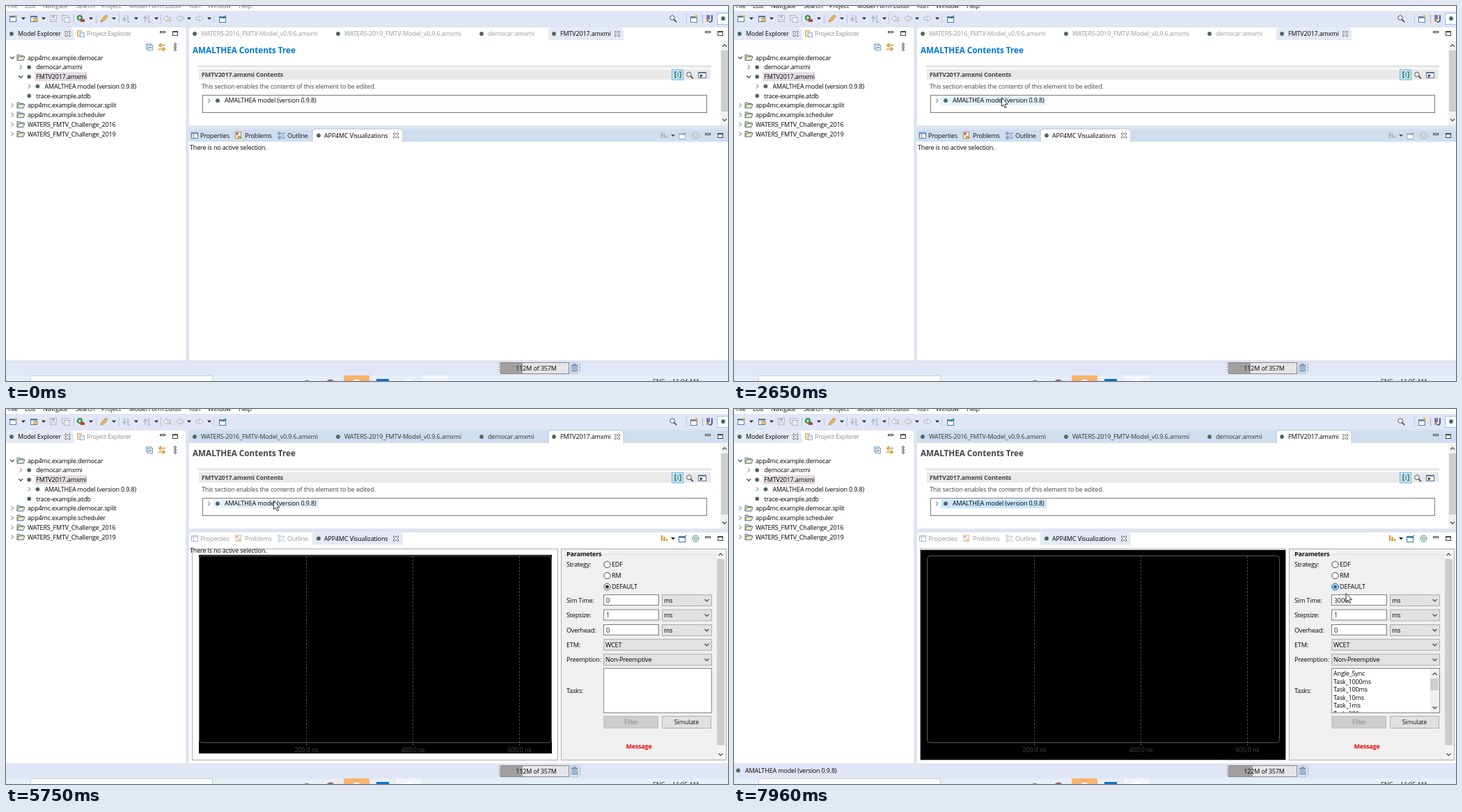
An HTML page that plays this animation: 1037x540 px, repeating every 8 s.

```html
<!DOCTYPE html>
<html lang="en">
<head>
<meta charset="utf-8">
<title>Model workbench</title>
<style>
  html, body { margin: 0; width: 100%; height: 100%; overflow: hidden; background: #e0e6f5; }
  svg { display: block; width: 1037px; height: 540px; }
  text { font: 9px "Open Sans", "Noto Sans", sans-serif; letter-spacing: -.16px; white-space: pre; }
  .b { font-weight: 700; letter-spacing: -.2px; }
  .title { font-size: 11.7px; letter-spacing: 0; }
</style>
</head>
<body>
<svg id="stage" viewBox="0 0 1037 540"></svg>
<script>
const LOOP = 8000;
const stage = document.getElementById('stage');

// Colours of the window and of focused and unfocused tab strips.
const BACK = '#e0e6f5', STRIP = '#cfdeef', IDLE_TAB = '#e4e9f6';

// Drawing helpers; text is placed by its vertical centre.
const text = (x, y, s, fill = '#000', cls = '', anchor = 'start') =>
  `<text x="${x}" y="${y + 3.2}" fill="${fill}" class="${cls}" text-anchor="${anchor}">${s}</text>`;
const rect = (x, y, w, h, fill = 'none', stroke = 'none', r = 0) =>
  `<rect x="${x}" y="${y}" width="${w}" height="${h}" fill="${fill}" stroke="${stroke}" rx="${r}"/>`;
const path = (d, stroke, fill = 'none', w = 1, extra = '') =>
  `<path d="${d}" stroke="${stroke}" fill="${fill}" stroke-width="${w}" ${extra}/>`;
const dot = (x, y, r, fill, stroke = 'none') =>
  `<circle cx="${x}" cy="${y}" r="${r}" fill="${fill}" stroke="${stroke}"/>`;
const during = (from, to, ...parts) => `<g data-on="${from},${to}">${parts.join('')}</g>`;

const mark = (x, y) => dot(x, y, 2.9, '#4c6b58');
const drop = (x, y = 18) => path(`M${x - 3},${y - 1.5}h6l-3,3.2z`, 'none', '#222');
const chevron = (x, y, dir = 'down', color = '#444') => path({
  down: `M${x - 3},${y - 1.5}l3,3l3,-3`,
  up: `M${x - 3},${y + 1.5}l3,-3l3,3`,
  right: `M${x - 1.5},${y - 3}l3,3l-3,3`
}[dir], color, 'none', 1.2);
const grip = (x, y, h, color = '#8c93a5') =>
  path(`M${x},${y}v${h}`, color, 'none', 1, 'stroke-dasharray="1 2"');
const cross = (x, y) => path(
  `M${x - 3.5},${y - 3.5}h2l1.5,2l1.5,-2h2v2l-2,1.5l2,1.5v2h-2l-1.5,-2l-1.5,2h-2v-2l2,-1.5l-2,-1.5z`,
  '#555', '#fff', .8);
const minMax = (x, y) =>
  rect(x - 3.5, y - 3.5, 7, 2, '#fff', '#444') + rect(x + 14.5, y - 3.5, 7, 6, '#fff', '#444') +
  path(`M${x + 14},${y - 2.5}h8`, '#444');
const pane = (x, y, w, h) => path(
  `M${x},${y + h}V${y + 5}q0,-5 5,-5h${w - 10}q5,0 5,5v${h - 5}z`, '#d3d9e8', '#fff');
const sheet = (x, y, c) => rect(x - 4.5, y - 3.5, 9, 8, '#fff', c) + path(`M${x - 5},${y - 2.5}h10`, c, 'none', 2);
const lens = (x, y) =>
  dot(x - 1, y - 1, 3.3, '#eef3fa', '#555') + path(`M${x + 1.5},${y + 1.5}l3.5,3.5`, '#555', 'none', 1.8);
const arrow = (x, dir) => path(
  `M${x - 5 * dir},16.3h${5 * dir}v-2.6l${5 * dir},4.3l${-5 * dir},4.3v-2.6h${-5 * dir}z`, '#a5a9b0', '#eef0f4', .9);

function menuBar() {
  const items = [[3, 'File'], [27, 'Edit'], [53, 'Navigate'], [100, 'Search'], [137, 'Project'],
    [177, 'Model Form Editor'], [263, 'Run'], [290, 'Window'], [334, 'Help']];
  const row = color => items.map(([x, s]) => text(x, -.2, s, color)).join('');
  return rect(0, 0, 1037, 7, '#fff') + during(0, 1920, row('#777')) + during(1920, LOOP, row('#111'));
}

function toolbar() {
  const gray = '#b3b7c0';
  return [
    sheet(10, 18, '#55789e'), dot(14.5, 14.5, 1.8, '#e8b93c'), sheet(40, 18, '#55789e'),
    rect(40, 18, 5, 4, '#f2d37a', '#a98a3c'),
    rect(63.5, 13.5, 9, 9, '#e8ebf1', gray), rect(66, 14, 4, 3, gray), rect(65.5, 19.5, 5, 3, '#fff', gray),
    rect(80.5, 13.5, 8, 7, '#e8ebf1', gray), rect(83.5, 16.5, 8, 7, '#e8ebf1', gray),
    dot(106, 17, 4.3, '#3c9b4e'), path('M104.7,15v4.2l3.5,-2.1z', 'none', '#fff'), rect(107, 19, 6, 4, '#b5493f'),
    path('M136,22l4,-6l4,-3l2,2l-3,4l-5,4z', '#b9803a', '#f1bb62'),
    path('M170,13v8m-2,-3l2,3.5l2,-3.5M175,13v10h3', gray, 'none', 1.6),
    path('M200,23v-8m-2,3l2,-3.5l2,3.5M205,13v10h3', gray, 'none', 1.6),
    arrow(231, -1), arrow(250, -1), arrow(278, 1), dot(235, 21, 1.5, '#d0bd83'),
    sheet(311, 19, '#3f789d'), path('M312,18l4,-4', '#3d9160', 'none', 2),
    [25, 54, 122, 155, 187, 216, 263, 292].map(x => drop(x)).join(''),
    [97.5, 129.5, 162.5, 222.5, 298.5].map(x => path(`M${x},12v13`, '#bcc4d5')).join(''),
    lens(958, 18), grip(977.5, 12, 13), sheet(988, 19, '#55789e'), dot(991.5, 14.5, 1.9, '#e8b93c'),
    path('M1000.5,12v13', '#a9b1c2'),
    rect(1006, 13, 5, 6, '#8b6fae'), path('M1014,13v7q0,3 -4,3', '#3c699c', 'none', 2), dot(1008, 21, 2, '#c88b3e'),
    rect(1021.5, 10.5, 20, 16, '#f7fbff', '#9bc3e6'), mark(1030, 18)
  ].join('');
}

function folder(x, y) {
  return path(`M${x - 5},${y + 4}v-8h4l1,1.5h4v2`, '#4d759b', '#f5dc92') +
    path(`M${x - 5},${y + 4}l2,-5.5h9l-2,5.5z`, '#4d759b', '#f3e6b4');
}

function explorer() {
  const rows = [[0, 'down', 'app4mc.example.democar'], [1, 'right', 'democar.amxmi'], [1, 'down', 'FMTV2017.amxmi'],
    [2, 'right', 'AMALTHEA model (version 0.9.8)'], [1, '', 'trace-example.atdb'],
    [0, 'right', 'app4mc.example.democar.split'], [0, 'right', 'app4mc.example.scheduler'],
    [0, 'right', 'WATERS_FMTV_Challenge_2016'], [0, 'right', 'WATERS_FMTV_Challenge_2019']];
  const tree = rows.map(([level, fold, name], i) => {
    const x = 9 + level * 12.2, y = 74.3 + i * 13.75;
    return (i === 2 ? rect(41, y - 6.5, 75, 13, '#e4dce2') : '') +
      (fold ? chevron(x, y, fold, fold === 'down' ? '#333' : '#999') : '') +
      (level ? mark(x + 12, y) : folder(x + 12, y)) + text(x + 22, y, name);
  }).join('');
  return pane(-6, 30, 265, 481) +
    path('M0,49V30.5h90q6,0 7,6l2,12.5z', 'none', IDLE_TAB) +
    mark(8, 40) + text(17, 39.8, 'Model Explorer') + cross(88.5, 40) +
    rect(102.5, 35.5, 6, 8, '#f3e3b4', '#c0aa72') + rect(106.5, 38.5, 6, 6, '#e5eef8', '#9db3cb') +
    text(116, 39.8, 'Project Explorer', '#8c8c8c') + minMax(225, 40) +
    rect(201.5, 54.5, 7, 7, '#fff', '#6e9cc4') + rect(203.5, 56.5, 7, 7, '#eef5fc', '#6e9cc4') + path('M205,60h4', '#345') +
    path('M229,56.5h-9m3,-3l-3,3l3,3M219,62h9m-3,-3l3,3l-3,3', '#d39a37', 'none', 1.7) +
    [55, 59, 63].map(y => dot(243, y, 1.4, '#fff', '#555')).join('') + tree;
}

function editor() {
  const names = [[280, 'WATERS-2016_FMTV-Model_v0.9.6.amxmi'], [486, 'WATERS-2019_FMTV-Model_v0.9.6.amxmi'], [692, 'democar.amxmi']];
  const tab = 'M779,49V36q0,-5.5 5,-5.5h97q6,0 6,5.5V49';
  const tabs = color => names.map(([x, s]) => text(x, 39.8, s, color)).join('');
  const title = color => text(268, 64.4, 'AMALTHEA Contents Tree', color, 'b title');
  const strip = path('M262.5,49V35q0,-4.5 5,-4.5H1037V49z', 'none', STRIP);
  return pane(262, 30, 785, 143) +
    during(0, 5750, path(tab, 'none', IDLE_TAB), tabs('#999'), title('#0078d7')) +
    during(5750, LOOP, strip, path(tab, '#b5c3d8', '#fff'), tabs('#333'), title('#444')) +
    [271, 477, 683, 787].map(x => mark(x, 40)).join('') +
    text(796, 39.8, 'FMTV2017.amxmi') + cross(878, 40) + minMax(1008, 40) +
    rect(275, 85, 738, 4, '#e9e9e9') + rect(277, 91, 735, 15, '#e9e9e9') +
    text(281, 99.2, 'FMTV2017.amxmi Contents', '#444', 'b') +
    rect(956.5, 91.5, 16, 15, '#bfe0f7', '#82b9e0') +
    path('M963,95h-2v8h2M967,95h2v8h-2', '#3c7a48', 'none', 1.4) + path('M965,96v6', '#3c7a48') + lens(982, 99.5) +
    rect(994.5, 95.5, 11, 8, '#fff', '#55789e') + rect(994, 95, 12, 2, '#55789e') + path('M997,98v5l4,-2.5z', 'none', '#333') +
    text(281, 116, 'This section enables the contents of this element to be edited.', '#444') +
    rect(282.5, 128.5, 724, 25, '#fff', '#777') +
    during(1245, 5800, rect(297, 130, 152, 13, '#e5f3ff')) +
    during(5800, LOOP, rect(297, 130, 152, 13, '#cce8ff')) +
    during(5800, 6160, rect(296.5, 129.5, 153, 13, 'none', '#99d1ff')) +
    chevron(291.5, 136.5, 'right', '#999') + mark(304, 136.2) + text(314, 136, 'AMALTHEA model (version 0.9.8)') +
    rect(1026, 50, 11, 122, '#f0f0f0') + rect(1027, 64, 10, 88, '#cdcdcd') +
    chevron(1032, 57, 'up') + chevron(1032, 164);
}

function viewTabs() {
  const tab = 'M440,195.5V182q0,-5 5,-5h120q5,0 5,5V195.5';
  const labels = c => text(279, 186.5, 'Properties', c) + text(343, 186.5, 'Problems', c) + text(404, 186.5, 'Outline', c);
  const tools = (chart, win, target, arrowTone) =>
    path('M942,182v8M945.5,184v6M949,187v3', chart, 'none', 2.4) +
    path('M955,185h6l-3,3.2z', 'none', arrowTone) + sheet(971, 187, win) + path('M973,186l4,-4', win, 'none', 1.5) +
    dot(990.5, 186.5, 4.5, '#fff', target) + dot(990.5, 186.5, 2, 'none', target);
  const icons =
    rect(266.5, 182.5, 9, 8, '#fff', '#5474a0') + path('M266,184h10M269.5,184v7', '#5474a0') +
    rect(329.5, 181.5, 8, 9, '#f8eedd', '#b48c62') + dot(332, 184, 1.8, '#cb5146') + rect(333, 187, 4, 3, '#d7a53b') +
    path('M391,182h3v3h-3zM391,188h3v3h-3zM396,183.5h5M396,187h3M396,190h5', '#4578b0');
  return pane(262, 177, 785, 334) +
    during(0, 5750, path('M263,195.5V182q0,-4.5 5,-4.5H1037V195.5z', 'none', STRIP),
      path(tab, '#b5c3d8', '#fff'), icons, labels('#111'), tools('#b5b5b5', '#a5a9b0', '#888', '#555')) +
    during(5750, LOOP, path(tab, 'none', IDLE_TAB), `<g opacity=".5">${icons}</g>`, labels('#999'),
      tools('#d99a33', '#3f789d', '#36796f', '#111')) +
    mark(449, 186.5) + text(457, 186.5, 'APP4MC Visualizations') + cross(560, 186.5) + minMax(1008, 187);
}

function plot() {
  const ticks = [[431.5, '200.0 ns'], [584.5, '400.0 ns'], [737.5, '600.0 ns']];
  return during(0, 5800, text(264, 203.5, 'There is no active selection.')) +
    during(5170, LOOP, rect(267.5, 201.5, 525, 304, 'none', '#aaa'), rect(797.5, 201.5, 237, 304, '#fff', '#aaa')) +
    during(5430, 5800, rect(277, 210, 507, 286, '#000')) +
    during(5800, LOOP, rect(268, 203, 524, 302, '#000')) +
    during(5430, LOOP,
      rect(277.5, 211.5, 506, 269, 'none', '#5c5c5c', 4),
      ticks.map(([x, s]) => path(`M${x},212v273`, '#4a4a4a', 'none', 1, 'stroke-dasharray="3 2"') +
        text(x, 491, s, '#484848', '', 'middle')).join(''));
}

function combo(x, y, w, s) {
  return rect(x + .5, y - 7.5, w, 16, '#e2e2e2', '#adadad') + text(x + 3, y + .5, s) + chevron(1006.5, y + .5);
}
const field = (y, s) => rect(858.5, y - 7.5, 79, 15, '#fff', '#7a7a7a') + text(862, y + .5, s);

function parameters() {
  const radio = (y, s) => dot(863.5, y, 4.6, '#fff', '#444') + text(870, y, s);
  const hover = (from, to, y) => during(from, to, dot(863.5, y, 4.6, 'none', '#0078d7'));
  const label = (y, s) => text(805, y, s);
  const tasks = ['Angle_Sync', 'Task_1000ms', 'Task_100ms', 'Task_10ms', 'Task_1ms', 'Task_200ms'];
  return during(5430, LOOP, rect(798, 202, 236, 303, '#f0f0f0'), rect(1021, 203, 12, 301, '#f4f4f4'),
      rect(1021, 216, 11, 268, '#cdcdcd'), chevron(1026.5, 209.5, 'up'), chevron(1026.5, 497.5)) +
    during(5430, 5480, rect(798, 203, 42, 11, '#fff')) +
    during(5480, LOOP,
      path('M800,209.5h4M857,209.5h159', '#dcdcdc'), text(805, 209, 'Parameters', '#111', 'b'),
      label(224, 'Strategy:'), radio(224, 'EDF'), radio(240, 'RM'), radio(256, 'DEFAULT'), dot(863.5, 256, 2.5, '#333')) +
    hover(7630, 7685, 224) + hover(7740, 7850, 240) +
    hover(7850, LOOP, 256) + during(7850, LOOP, dot(863.5, 256, 2.5, '#1268b3')) +
    during(5520, LOOP,
      label(275.5, 'Sim Time:'), label(297, 'Stepsize:'), label(318.5, 'Overhead:'),
      field(275, ''), field(296.5, '1'), field(318, '0'),
      [275, 296.5, 318].map(y => combo(942, y, 71, 'ms')).join('')) +
    during(5520, 6110, text(862, 275.5, '0')) + during(6110, LOOP, text(862, 275.5, '3000')) +
    during(5570, LOOP,
      label(339.5, 'ETM:'), combo(858, 339, 155, 'WCET'),
      label(361, 'Preemption:'), combo(858, 360.5, 155, 'Non-Preemptive'),
      label(405.5, 'Tasks:'), rect(858.5, 373.5, 155, 64, '#fff', '#828790'),
      rect(858.5, 442.5, 78, 17, '#ccc', '#bfbfbf'), text(898, 451, 'Filter', '#888', '', 'middle'),
      rect(942.5, 442.5, 70, 17, '#e1e1e1', '#adadad'), text(977.5, 451, 'Simulate', '#111', '', 'middle'),
      text(909, 486, 'Message', '#f00000', 'b', 'middle')) +
    during(6110, LOOP,
      '<clipPath id="list"><path d="M859,374h154v63h-154z"/></clipPath><g clip-path="url(#list)">',
      tasks.map((s, i) => text(861, 381 + i * 11.5, s)).join(''), '</g>',
      rect(1000, 374, 13, 63, '#f0f0f0'), rect(1000, 388, 12, 17, '#cdcdcd'),
      chevron(1006.5, 381.5, 'up'), chevron(1006.5, 430));
}

function statusBar() {
  const heap = (from, to, used, w) => during(from, to, rect(711, 514, w, 15, '#a39f9f'),
    text(761.5, 521.5, used + 'M of 357M', '#000', '', 'middle'));
  return during(5850, LOOP, mark(6, 520.5), text(16, 520.8, 'AMALTHEA model (version 0.9.8)')) +
    grip(708.5, 514, 15, '#555') + grip(824.5, 514, 15, '#555') + rect(710.5, 513.5, 98, 16, '#e6e6ea', '#888') +
    heap(0, 5900, 112, 31) + heap(5900, 6440, 121, 34) + heap(6440, LOOP, 122, 34) +
    rect(810.5, 513.5, 11, 16, '#dbe6f3', '#b9c6d8') + rect(813, 518, 7, 8, '#dcebf8', '#51779c') +
    path('M812,517h9M815,515.5h3M815.5,519v6M817.8,519v6', '#51779c');
}

function taskbar() {
  const clock = s => text(957, 541, s, '#222');
  return rect(0, 532, 1037, 8, '#e6eef6') + rect(35.5, 532.5, 261, 12, '#fff', '#c9ced4') +
    during(0, 1920, rect(597, 532, 37, 8, '#f3f6f9')) + during(1920, LOOP, rect(560, 532, 37, 8, '#f3f6f9')) +
    dot(432, 544, 5.5, '#8c8c8c') + dot(466, 544, 6.5, '#9a6a5c') +
    rect(485, 532, 37, 8, '#f8b36d') + dot(503.5, 544, 6.5, '#fdf3e6') +
    rect(532, 537, 18, 4, '#0d72cf') + dot(578, 544, 7, '#fff') +
    text(929, 541, 'ENG', '#222') + during(0, 2650, clock('11:04 AM')) + during(2650, LOOP, clock('11:05 AM'));
}

stage.innerHTML = rect(0, 0, 1037, 540, BACK) + menuBar() + toolbar() + explorer() + editor() +
  viewTabs() + plot() + parameters() + statusBar() + taskbar() +
  during(1700, 1840, dot(383.5, 132.5, 9.3, 'rgba(255,240,0,.45)')) +
  '<g id="pointer">' + path('M0,0V12L2.8,9.5L4.8,14.2L6.8,13.3L4.8,8.8H8.6Z', '#222', '#fff', .9) + '</g>';

// Pointer moves: start, end, steps, target x and y, easing, upward bend.
const linear = p => p;
const easeOut = p => 1 - (1 - p) ** 2;
const moves = [
  [40, 170, 3, 756, 297, linear, 0],
  [360, 530, 5, 509, 128, easeOut, 0],
  [720, 1350, 13, 384.5, 132.5, easeOut, 9],
  [6060, 6210, 4, 568, 161, p => p ** 2.1, 0],
  [6390, 6540, 4, 752, 206, easeOut, 0],
  [7130, 7230, 3, 874, 217, easeOut, 0],
  [7630, 7960, 7, 879, 265.5, linear, 0]
];

function pointerAt(t) {
  let x = 837, y = 448;
  for (const [start, end, steps, toX, toY, ease, bend] of moves) {
    if (t < start) break;
    const step = Math.min(steps, 1 + Math.floor((t - start) / (end - start) * (steps - 1) + 1e-6));
    const p = step / steps, k = ease(p);
    x += (toX - x) * k;
    y += (toY - y) * k - bend * Math.sin(Math.PI * p);
  }
  return [x, y];
}

const pointer = document.getElementById('pointer');
const timed = [...stage.querySelectorAll('[data-on]')].map(el => [el, ...el.dataset.on.split(',').map(Number)]);

function render(now) {
  const t = now % LOOP;
  for (const [el, from, to] of timed) el.style.display = t >= from && t < to ? '' : 'none';
  pointer.style.display = t < 40 ? 'none' : '';
  pointer.setAttribute('transform', `translate(${pointerAt(t)})`);
}

let origin;
function tick(now) {
  origin ??= now;
  render(now - origin);
  requestAnimationFrame(tick);
}
render(0);
requestAnimationFrame(tick);
</script>
</body>
</html>
```
